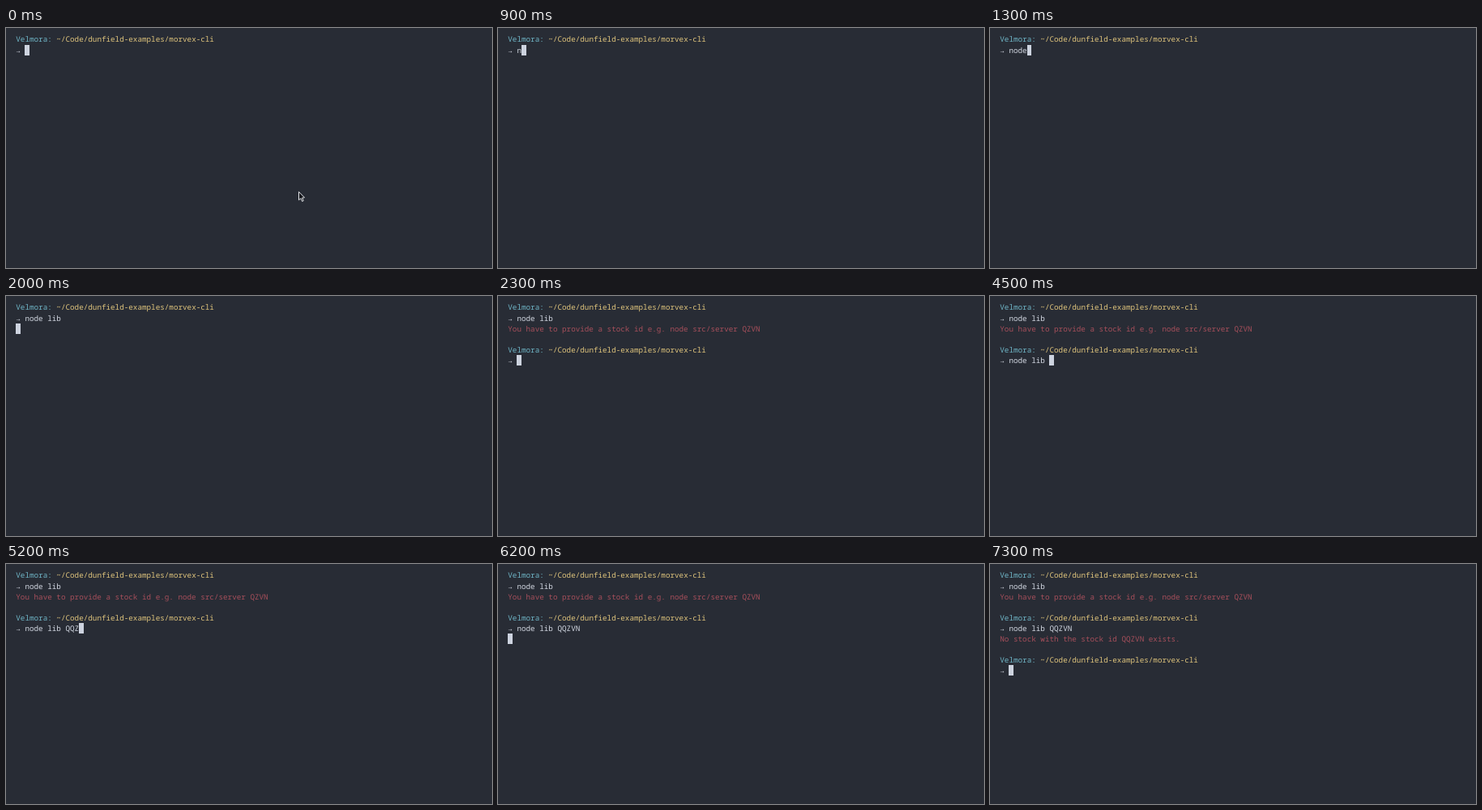
These frames come from a looping animation (600 px wide and 297 px high, 8000 ms). An HTML page:

```html
<!DOCTYPE html>
<html lang="en">
<head>
<meta charset="utf-8">
<title>Terminal session</title>
<style>
  html, body { margin: 0; width: 100%; height: 100%; overflow: hidden; background: #282c35; }
  pre {
    margin: 0;
    position: absolute;
    left: 12.3px;
    top: 7.45px;
    font: 9.28px/13.08px "Noto Sans Mono", "DejaVu Sans Mono", monospace;
    text-rendering: geometricPrecision;
    font-variant-ligatures: none;
    color: #d3d8e2;
  }
  b, i, s { font: inherit; text-decoration: none; }
  b { color: #6fb5c6; }
  i { color: #dfc47c; }
  s { color: #a64f5b; }
  #caret {
    display: inline-block;
    width: 1ch;
    height: 13.08px;
    vertical-align: top;
    background: #cdd3df;
  }
  svg { position: absolute; left: 0; top: 0; overflow: visible; }
</style>
</head>
<body>
<pre><span id="out"></span><span id="caret"></span></pre>
<svg width="10" height="14">
  <path d="M0 0V10.2L2.4 8.1L4.1 11.8L5.7 11.1L4.1 7.5L7 7.2Z"
        fill="#14161a" stroke="#e4e6ea" stroke-width="1" stroke-linejoin="round"/>
</svg>
<script>
const LOOP = 8000;
const prompt = '<b>Velmora:</b> <i>~/Code/dunfield-examples/morvex-cli</i>\n→ ';
const error = text => `<s>${text}</s>\n`;

// Each entry appends its text to the terminal at the given time.
const output = [
  [0, prompt],
  [800, 'n'], [1000, 'o'], [1100, 'd'], [1200, 'e'], [1400, ' '],
  [1500, 'l'], [1700, 'i'], [1800, 'b'], [2000, '\n'],
  [2200, error('You have to provide a stock id e.g. node src/server QZVN')],
  [2300, '\n' + prompt],
  [3600, 'n'], [3900, 'o'], [4000, 'd'], [4100, 'e'], [4200, ' l'],
  [4400, 'i'], [4500, 'b '],
  [4900, 'Q'], [5100, 'Q'], [5200, 'Z'], [5500, 'V'], [5700, 'N'], [6200, '\n'],
  [7100, error('No stock with the stock id QQZVN exists.')],
  [7300, '\n' + prompt]
];

// The pointer nudges upwards, then hides once typing starts.
const pointerPath = [[0, 361.5, 202.7], [100, 360.5, 194], [200, 359.5, 187.7]];
const HIDE_POINTER = 800;

const out = document.getElementById('out');
const pointer = document.querySelector('svg');
let shown = 0;

function draw(now) {
  const t = now % LOOP;
  const count = output.filter(([at]) => at <= t).length;
  if (count !== shown) {
    out.innerHTML = output.slice(0, count).map(([, text]) => text).join('');
    shown = count;
  }
  const [, x, y] = pointerPath.filter(([at]) => at <= t).pop();
  pointer.style.transform = `translate(${x}px, ${y}px)`;
  pointer.style.visibility = t < HIDE_POINTER ? 'visible' : 'hidden';
}

const start = performance.now();
function tick() {
  draw(performance.now() - start);
  requestAnimationFrame(tick);
}
tick();
</script>
</body>
</html>
```
